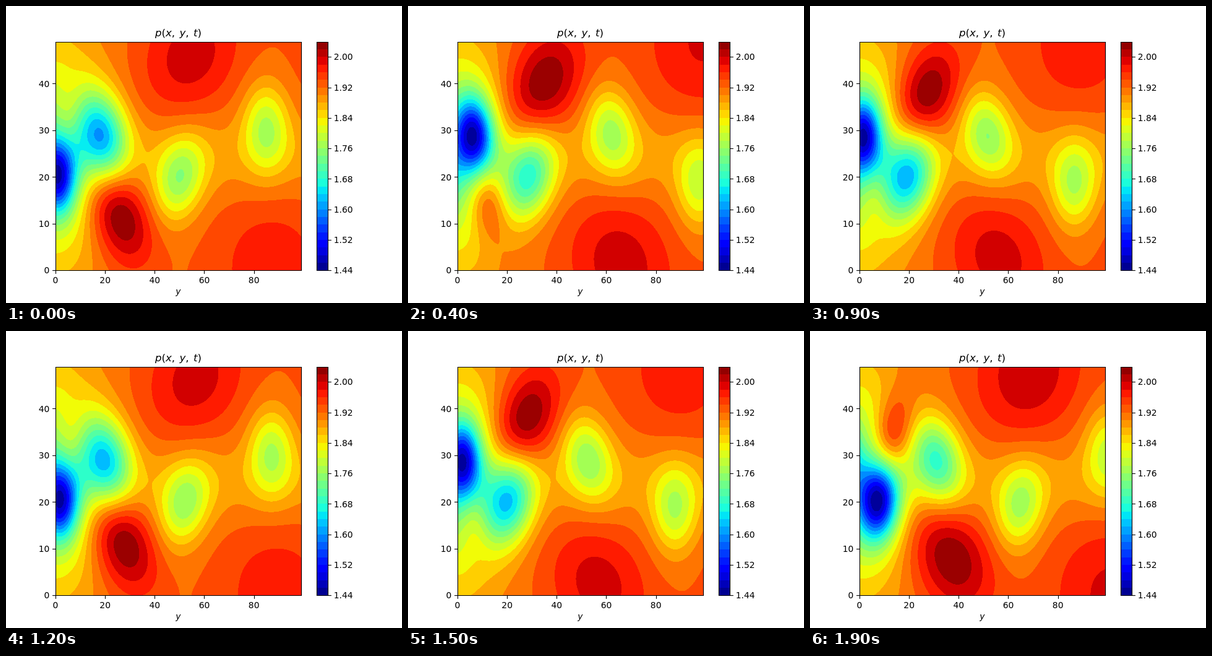
Animation, 640 px wide and 480 px high, one loop 2 s. Source, as an HTML page with a canvas:

```html
<!DOCTYPE html>
<html lang="en">
<head>
<meta charset="utf-8">
<title>Pressure field</title>
<style>
  html, body { margin: 0; width: 100%; height: 100%; overflow: hidden; background: #fff; }
  canvas { position: absolute; left: 81px; top: 59px; }
  svg { position: absolute; left: 0; top: 0; }
  text { font: 13.89px "DejaVu Sans", sans-serif; }
  .title { font-size: 16.67px; }
  .i { font-style: italic; }
</style>
</head>
<body>
<canvas id="plot" width="396" height="368"></canvas>
<svg id="axes" width="640" height="480">
  <text class="title" x="278.4" y="49.3" text-anchor="middle"><tspan class="i">p</tspan>(<tspan class="i">x</tspan>,<tspan class="i" dx="7.3">y</tspan>,<tspan class="i" dx="7.3">t</tspan>)</text>
  <text class="i" x="278.4" y="466" text-anchor="middle">y</text>
</svg>
<script>
const BANDS = 21, FRAME_MS = 100, FRAMES = 20, SHED_MS = 295.5;
const LEFT = 80, BOTTOM = 427.2, SCALE_X = 396.8 / 99, SCALE_Y = 369.6 / 49, MID = 24.5;

// ---- colours ----
const clamp = (v, lo, hi) => Math.max(lo, Math.min(hi, v));
function jet(v) {
  const ramp = (a, b) => clamp((v - a) / (b - a), 0, 1);
  return [
    v < 0.7 ? ramp(0.35, 0.66) : 1 - 0.5 * ramp(0.89, 1),
    v < 0.5 ? ramp(0.125, 0.375) : 1 - ramp(0.64, 0.91),
    v < 0.2 ? 0.5 + 0.5 * ramp(0, 0.11) : 1 - ramp(0.34, 0.65)
  ].map(c => Math.round(c * 255));
}
const palette = Array.from({ length: BANDS }, (_, i) => jet((i + 0.5) / BANDS));

// ---- axes and colour bar ----
const svg = document.getElementById("axes");
function add(tag, attributes, content = "") {
  const node = document.createElementNS(svg.namespaceURI, tag);
  for (const key in attributes) node.setAttribute(key, attributes[key]);
  node.textContent = content;
  svg.append(node);
}
const stroke = d => add("path", { d, fill: "none", stroke: "#000", "stroke-width": 1.11 });
const snap = v => Math.round(v) + 0.5;

for (let i = 0; i < 30; i++) {
  const top = BOTTOM - (i + 1) * 12.32;
  add("rect", { x: 502, y: Math.round(top), width: 18.5,
    height: Math.round(top + 12.32) - Math.round(top), fill: `rgb(${jet((i + 0.5) / 30)})` });
}
stroke("M80.5 58.5H477.5V427.5H80.5Z");
stroke("M502.5 58.5H520.5V427.5H502.5Z");
for (let v = 0; v <= 80; v += 20) {
  const x = LEFT + v * SCALE_X;
  stroke(`M${snap(x)} 428v4.9`);
  add("text", { x, y: 447.5, "text-anchor": "middle" }, v);
}
for (let v = 0; v <= 40; v += 10) {
  const y = BOTTOM - v * SCALE_Y;
  stroke(`M80 ${snap(y)}h-4.9`);
  add("text", { x: 70.3, y: y + 5.2, "text-anchor": "end" }, v);
}
for (let i = 0; i < 8; i++) {
  const y = BOTTOM - i * 49.28;
  stroke(`M521 ${snap(y)}h4.9`);
  add("text", { x: 529.8, y: y + 5.2 }, (1.44 + i * 0.08).toFixed(2));
}

// ---- vortex street ----
// Smooth curve through evenly spaced values, as a function of vortex age.
function curve(start, step, values) {
  const value = i => values[clamp(i, 0, values.length - 1)];
  return age => {
    const p = (age - start) / step, i = Math.floor(p), t = p - i;
    const [a, b, c, d] = [value(i - 1), value(i), value(i + 1), value(i + 2)];
    return b + t * (c - a + t * (2 * a - 5 * b + 4 * c - d + t * (3 * (b - c) + d - a))) / 2;
  };
}
// Age is counted in half shedding periods; levels are in colour bands.
const LOW = {
  x: curve(-2, 1, [-27, -13, 1, 19, 50, 85, 120, 155]),
  y: curve(0, 1, [4.5, 4.5, 5, 6.1, 6.5]),
  level: curve(-1, 1 / 3, [9.5, 7, -0.6, 0.4, 0.4, 0.4, 5.9, 8.2, 9.4, 10.9, 11.4, 11.3, 11.5, 12.2, 12.7, 13.2]),
  width: curve(0, 1, [5, 6.9, 6.8, 6.3, 6.3]),
  height: curve(0, 1, [5.6, 6.4, 6.2, 6.5, 6.5]),
  shear: curve(0, 1, [0, 0.2, 0.25, 0.02, 0])
};
const HIGH = {
  x: curve(-1, 1, [-10, 5, 25, 54.5, 87, 121, 155]),
  y: curve(0, 1, [-8, -12.2, -21.5, -24, -24]),
  level: curve(0, 1 / 3, [11.2, 15.5, 20.4, 20.5, 20.8, 20.8, 19.6, 19.6, 20.3, 18.7, 19.1, 19.5, 18]),
  width: curve(0, 1, [4, 8.7, 14, 17, 18]),
  height: curve(0, 1, [5.5, 7.5, 9.5, 12, 12]),
  shear: curve(0, 1, [0.1, 0.45, 0.3, 0, 0])
};

const background = (x, y) =>
  15.4 + 1.3 * (1 - Math.exp(-y * y / 81)) - 6 * Math.exp(-x * x / 338 - y * y / 512);

function bell(blob, x, y) {
  const dy = y - blob.y;
  const a = (x - blob.x + blob.shear * dy) / blob.width, b = dy / blob.height;
  const r = a * a + b * b;
  return r > 30 ? 0 : Math.exp(-r / 2);
}

// Gaussian elimination on an augmented matrix.
function solve(m) {
  const n = m.length;
  for (let c = 0; c < n; c++) {
    let pivot = c;
    for (let r = c + 1; r < n; r++) if (Math.abs(m[r][c]) > Math.abs(m[pivot][c])) pivot = r;
    [m[c], m[pivot]] = [m[pivot], m[c]];
    for (let r = 0; r < n; r++) {
      if (r === c) continue;
      const k = m[r][c] / m[c][c];
      for (let j = c; j <= n; j++) m[r][j] -= k * m[c][j];
    }
  }
  return m.map((row, i) => row[n] / row[i]);
}

function vortices(time) {
  const s = time / SHED_MS, newest = Math.floor(s) + 1, blobs = [];
  for (let id = newest; id > newest - 6; id--) {
    const age = s - id, side = id % 2 ? 1 : -1;
    for (const kind of [LOW, HIGH]) {
      if (kind === HIGH && age < 0) continue;
      blobs.push({
        x: kind.x(age), y: side * kind.y(age), level: kind.level(age),
        width: kind.width(age), height: kind.height(age), shear: side * kind.shear(age)
      });
    }
  }
  // Choose strengths so that each centre reaches its level.
  const strengths = solve(blobs.map(at =>
    [...blobs.map(b => bell(b, at.x, at.y)), at.level - background(at.x, at.y)]));
  blobs.forEach((b, i) => b.strength = strengths[i]);
  return blobs;
}

const canvas = document.getElementById("plot"), ctx = canvas.getContext("2d");
const image = ctx.createImageData(canvas.width, canvas.height);
image.data.fill(255);

function draw(time) {
  const blobs = vortices(time);
  let p = 0;
  for (let py = 0; py < canvas.height; py++) {
    const y = (BOTTOM - 59.5 - py) / SCALE_Y - MID;
    for (let px = 0; px < canvas.width; px++, p += 4) {
      const x = (px + 81.5 - LEFT) / SCALE_X;
      let q = background(x, y);
      for (const b of blobs) q += b.strength * bell(b, x, y);
      const color = palette[clamp(Math.floor(q), 0, BANDS - 1)];
      image.data[p] = color[0];
      image.data[p + 1] = color[1];
      image.data[p + 2] = color[2];
    }
  }
  ctx.putImageData(image, 0, 0);
}

let shown = -1;
const begin = performance.now();
function tick() {
  const frame = Math.floor((performance.now() - begin) / FRAME_MS) % FRAMES;
  if (frame !== shown) draw((shown = frame) * FRAME_MS);
  requestAnimationFrame(tick);
}
tick();
</script>
</body>
</html>
```
